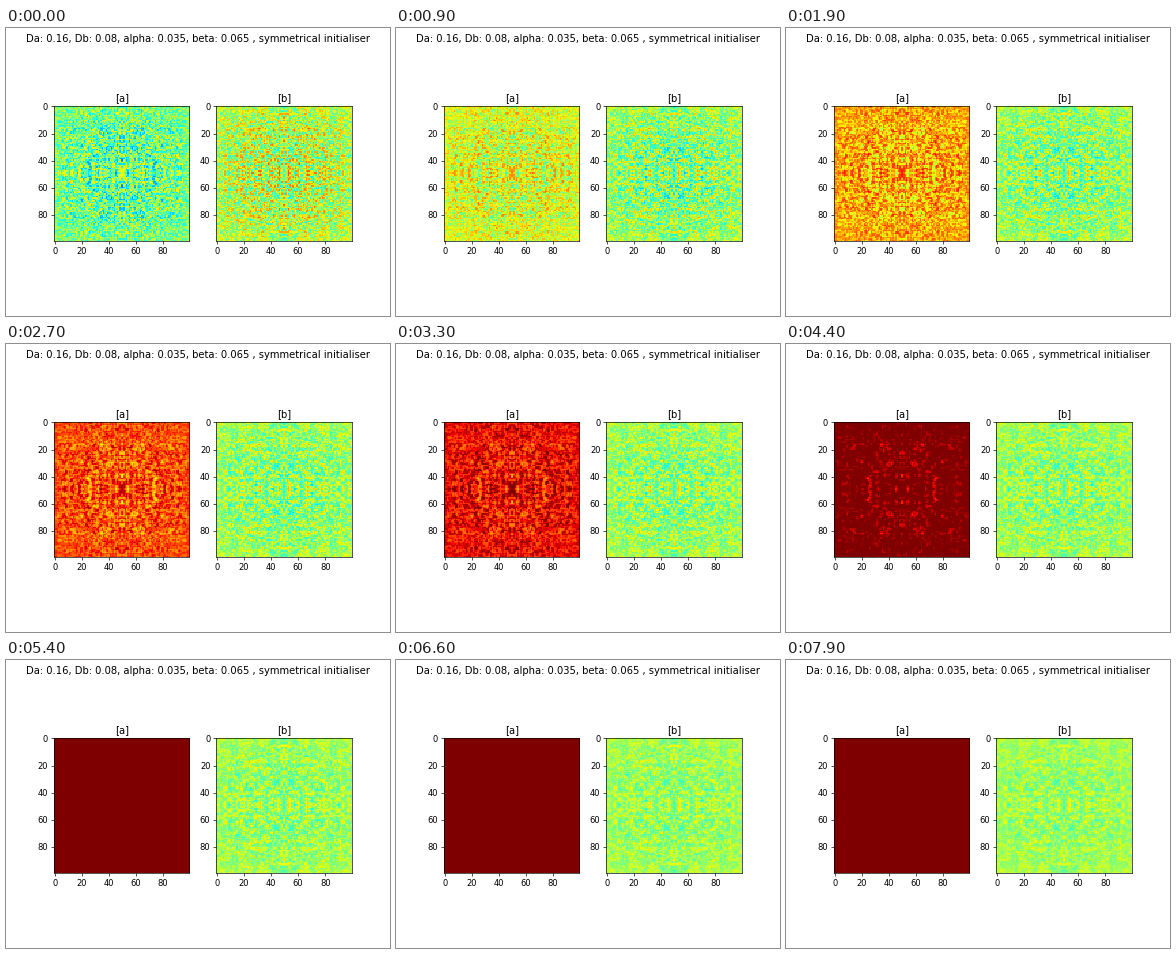
These frames come from a looping animation (384x288 px, 8 s). A matplotlib script:

```python
import matplotlib.pyplot as plt
import numpy as np
from matplotlib.animation import FuncAnimation

N = 100
FRAMES, INTERVAL = 80, 100
DA, DB, ALPHA, BETA = 0.16, 0.08, 0.035, 0.065
DT = 0.035  # simulated time per frame
SOFTEN = 0.08  # blur of the starting noise

rng = np.random.default_rng(7)
pos = (np.arange(N) + 0.5) / N
arch = np.sin(np.pi * pos) ** 0.3
bell = np.outer(arch, arch)
envelope = 0.35 + 0.65 * bell

wave = 2 - 2 * np.cos(2 * np.pi * np.fft.fftfreq(N))
k2 = wave[:, None] + wave[None, :]


def noise_spectrum(scale):
    """Spectrum of noise mirrored about both centre lines."""
    half = N // 2
    quarter = rng.uniform(-1, 1, (half, half)) * np.sqrt(3)
    top = np.hstack([quarter, quarter[:, ::-1]])
    noise = np.vstack([top, top[::-1]])
    return np.fft.fft2(scale * envelope * noise) * np.exp(-SOFTEN * k2)


spec_a = noise_spectrum(0.155)
spec_b = noise_spectrum(0.165)


def diffuse(spec, rate, decay, t):
    return np.fft.ifft2(spec * np.exp(-(rate * k2 + decay) * t)).real


def state(i):
    """Concentrations of both species, scaled to the colour range."""
    t, sec = i * DT, i * INTERVAL / 1000
    settle = np.exp(-sec / 0.3)
    a = 0.515 + 0.118 * sec - (0.015 + 0.025 * settle) * bell
    a = a + diffuse(spec_a, DA, ALPHA, t)
    drift = 0.08 * settle - 0.045 * np.exp(-sec / 5)
    b = 0.555 + drift * bell + diffuse(spec_b, DB, ALPHA + BETA, t)
    return a, b


fig, axes = plt.subplots(1, 2, figsize=(6.4, 4.8), dpi=60)
fig.suptitle(f"Da: {DA}, Db: {DB}, alpha: {ALPHA}, beta: {BETA} , "
             "symmetrical initialiser")

images = []
for ax, name, grid in zip(axes, "ab", state(0)):
    images.append(ax.imshow(grid, cmap="jet", vmin=0, vmax=1,
                            interpolation="nearest"))
    ax.set_title(f"[{name}]")
    ax.set_xticks(range(0, N, 20))
    ax.set_yticks(range(0, N, 20))


def update(i):
    for image, grid in zip(images, state(i)):
        image.set_data(grid)
    return images


anim = FuncAnimation(fig, update, frames=FRAMES, interval=INTERVAL,
                     repeat=True, repeat_delay=0, blit=False)
plt.show()
```
